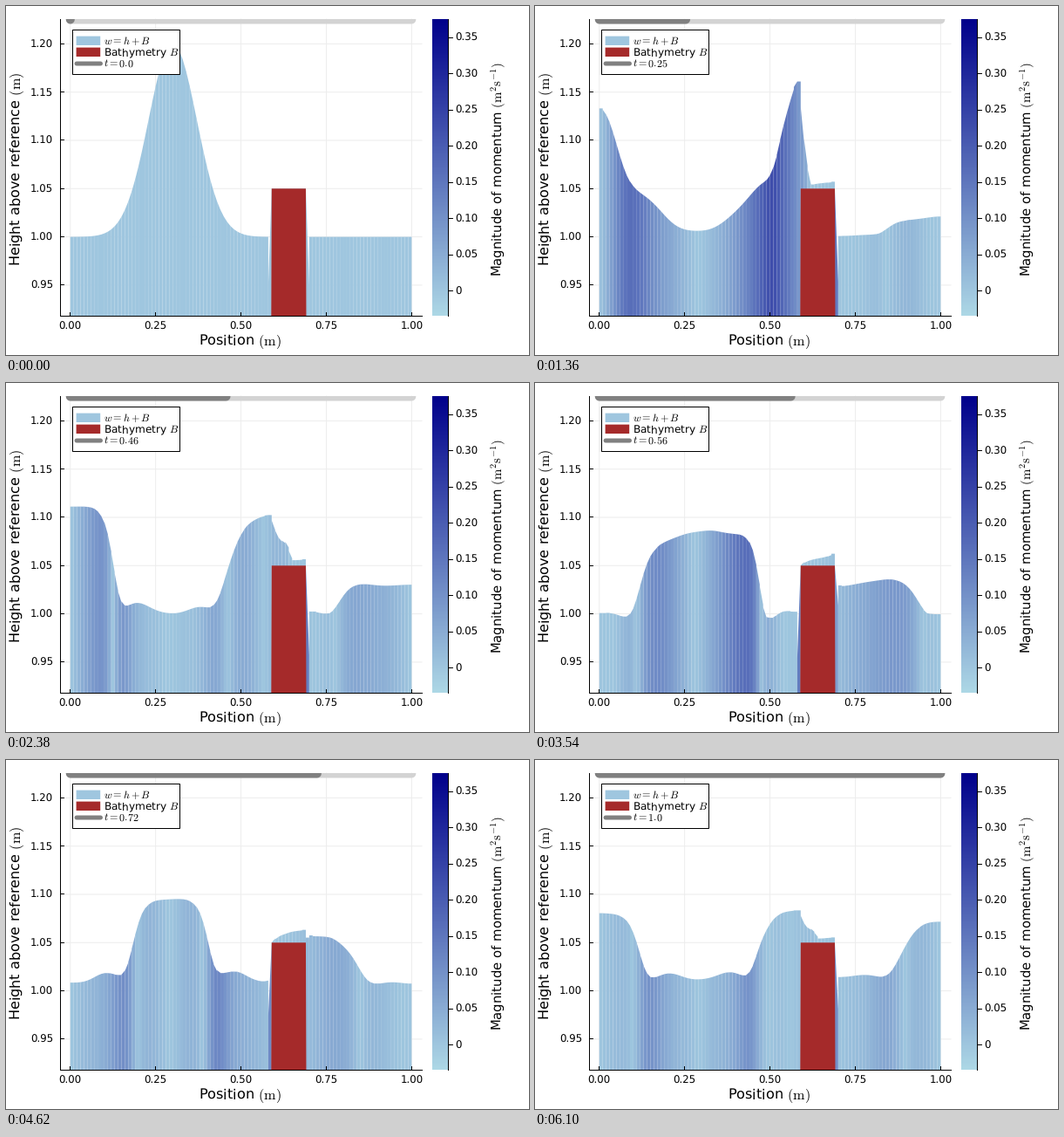
A matplotlib script that plays this animation: 600x400 px, repeating every 6120 ms.

```python
import numpy as np
import matplotlib.pyplot as plt
from matplotlib.animation import FuncAnimation
from matplotlib.collections import PolyCollection
from matplotlib.colors import LinearSegmentedColormap
from matplotlib.patches import Polygon, Rectangle

plt.rcParams.update({"font.family": "DejaVu Sans", "mathtext.fontset": "cm",
                     "text.hinting": "none"})

# --- Shallow water over a block: central-upwind scheme, linear bathymetry ---
N, G, THETA = 100, 9.81, 2.0
DX = 1 / N
FRAMES, INTERVAL = 306, 20

nodes = np.arange(N + 1)
faces = nodes * DX
B = np.where((nodes >= 59) & (nodes <= 69), 1.05, 0.0)
BL, BR = B[:-1], B[1:]
BC = (BL + BR) / 2


def half_slope(q, sign):
    """Generalised minmod slope, with walls mirrored by sign."""
    d = np.diff(np.concatenate(([sign * q[0]], q, [sign * q[-1]])))
    a, b = d[:-1], d[1:]
    c = (a + b) / 2
    size = np.minimum(THETA * np.minimum(abs(a), abs(b)), abs(c))
    return np.where(a * b > 0, np.sign(c) * size, 0) / 2


def surface(w):
    """Water level at both ends of every cell, never below the bed."""
    s = half_slope(w, 1)
    left, right = w - s, w + s
    dry = right < BR
    left, right = np.where(dry, 2 * w - BR, left), np.where(dry, BR, right)
    dry = left < BL
    return np.where(dry, BL, left), np.where(dry, 2 * w - BL, right)


def side(w, m):
    """Velocity, momentum, momentum flux and wave speed on one side of the faces."""
    h = np.maximum(w - B, 0)
    h4 = h ** 4
    u = np.sqrt(2) * h * m / np.sqrt(h4 + np.maximum(h4, DX ** 4))
    m = h * u
    return u, m, m * u + G / 2 * h * h, np.sqrt(G * h)


def rates(w, m):
    wl, wr = surface(w)
    s = half_slope(m, -1)
    ml, mr = m - s, m + s
    w1, w2 = np.append(wl[0], wr), np.append(wl, wr[-1])
    u1, m1, f1, c1 = side(w1, np.append(-ml[0], mr))
    u2, m2, f2, c2 = side(w2, np.append(ml, -mr[-1]))
    hi = np.maximum(np.maximum(u1 + c1, u2 + c2), 0)
    lo = np.minimum(np.minimum(u1 - c1, u2 - c2), 0)
    span = hi - lo
    span[span < 1e-12] = 1
    mass = (hi * m1 - lo * m2 + hi * lo * (w2 - w1)) / span
    force = (hi * f1 - lo * f2 + hi * lo * (m2 - m1)) / span
    dw = -np.diff(mass) / DX
    dm = -np.diff(force) / DX - G * (w - BC) * (BR - BL) / DX
    return dw, dm, max(hi.max(), -lo.min())


def simulate(times):
    x = faces[:-1] + DX / 2
    w = np.maximum(1 + 0.2 * np.exp(-100 * (x - 0.3) ** 2), BC)
    m = np.zeros(N)
    t, states = 0.0, []
    for stop in times:
        while t < stop - 1e-10:
            dw, dm, speed = rates(w, m)
            dt = min(max(0.4 * DX / speed, 1e-4), stop - t)
            w1 = np.maximum(w + dt * dw, BC)
            m1 = m + dt * dm
            dw, dm, _ = rates(w1, m1)
            w = np.maximum((w + w1 + dt * dw) / 2, BC)
            m = (m + m1 + dt * dm) / 2
            t += dt
        states.append((*surface(w), abs(m)))
    return states


# Adaptive time steps: slower while the wave climbs the block
times = np.interp(np.arange(FRAMES),
                  [0, 37, 68, 119, 177, 231, 305],
                  [0, 0.141, 0.2535, 0.4565, 0.5615, 0.723, 1])
states = simulate(times)

# --- Drawing, in pixel coordinates ---
PX = 0.72
LEFT, RIGHT, TOP, BOTTOM = 62, 477, 15, 355
M_LO, M_HI = -0.0343, 0.3753
cmap = LinearSegmentedColormap.from_list("depth", ["lightblue", "darkblue"])


def px(x):
    return 73.75 + 391.6 * np.asarray(x)


def py(w):
    return 43.4 + 1106 * (1.2 - np.asarray(w))


def cpy(v):
    return 326.7 - 830 * v


def shade(m):
    return cmap(np.clip((m - M_LO) / (M_HI - M_LO), 0, 1))


fig = plt.figure(figsize=(6, 4), dpi=100, facecolor="white")
ax = fig.add_axes([0, 0, 1, 1])
ax.axis("off")


def line(xs, ys, color="black", width=1, **kw):
    return ax.plot(xs, ys, color=color, lw=width * PX, **kw)[0]


def label(x, y, s, size=8.5, **kw):
    return ax.text(x, y, s, fontsize=size, va="baseline", zorder=9, **kw)


def grid(xs, ys):
    line(xs, ys, "0.93", zorder=1, snap=False)


xticks = np.arange(5) / 4
yticks = 0.95 + 0.05 * np.arange(6)

for v in xticks:
    x = px(v)
    grid([x, x], [TOP, BOTTOM])
    line([x - 0.5] * 2, [BOTTOM, BOTTOM - 4], zorder=5)
    label(x, 371.2, f"{v:.2f}", ha="center")
for v in yticks:
    y = py(v)
    grid([LEFT, RIGHT], [y, y])
    line([LEFT, LEFT + 4], [y - 0.5] * 2, zorder=5)
    label(54, y + 4.1, f"{v:.2f}", ha="right")
line([LEFT, LEFT, RIGHT], [TOP, BOTTOM, BOTTOM], zorder=5)

label(268.5, 388.7, r"Position $(\mathrm{m})$", 11.6, ha="center")
label(17, 186.5, r"Height above reference $(\mathrm{m})$", 11.6, ha="center",
      rotation=90, rotation_mode="anchor")
label(569.3, 187, r"Magnitude of momentum $(\mathrm{m}^2\mathrm{s}^{-1})$", 10.7,
      ha="center", rotation=90, rotation_mode="anchor")

# Colour scale
ax.imshow(np.linspace(0, 1, 256)[:, None], cmap=cmap, origin="lower",
          extent=(489, 507, 355.5, 15.5), aspect="auto", interpolation="nearest")
line([507, 507], [TOP, BOTTOM], zorder=5)
for k in range(8):
    y = cpy(0.05 * k)
    line([507, 512], [y - 0.5] * 2, zorder=5)
    label(515, y + 4, f"{0.05 * k:.2f}" if k else "0", ha="left")

# Water, block and time bar
frame = Rectangle((62, 15), 415, 341, transform=ax.transData)
water = PolyCollection([], linewidths=0, edgecolors="none", zorder=2, snap=False)
ax.add_collection(water, autolim=False)
water.set_clip_path(frame)
block = Polygon(np.column_stack((px([0.58, 0.59, 0.69, 0.70]),
                                 py([0, 1.05, 1.05, 0]))),
                facecolor="brown", edgecolor="none", zorder=3)
ax.add_patch(block)
block.set_clip_path(frame)


def time_bar(t, color):
    bar = line(px([0, t]), [15.5, 15.5], color, 10, zorder=4,
               solid_capstyle="round", snap=False)
    bar.set_clip_path(frame)
    return bar


time_bar(1, "lightgray")
elapsed = time_bar(0.001, "gray")

# Legend
ax.add_patch(Rectangle((76, 27), 123, 51, facecolor="white",
                       edgecolor="black", lw=PX, zorder=7))
for y, color in ((34.6, shade(0)), (47.6, "brown")):
    ax.add_patch(Rectangle((80.6, y), 27.6, 10.4, facecolor=color, lw=0,
                           zorder=8, snap=False))
line([81, 108.5], [66, 66], "gray", 5, zorder=8, solid_capstyle="round", snap=False)
label(112, 44, "$w = h + B$", 8.7)
label(112, 57, "Bathymetry $B$", 8.7)
clock = label(112, 70, "", 8.7)

ax.set_xlim(0, 600)
ax.set_ylim(400, 0)

edges = px(faces)
verts = np.full((N, 4, 2), 400.0)
verts[:, 0, 0] = verts[:, 1, 0] = edges[:-1]
verts[:, 2, 0] = verts[:, 3, 0] = edges[1:]


def draw(i):
    left, right, m = states[i]
    verts[:, 1, 1] = py(left)
    verts[:, 2, 1] = py(right)
    water.set_verts(verts.copy())
    water.set_facecolor(shade(m))
    t = float(times[i])
    elapsed.set_xdata(px([0, max(t, 0.0002)]))
    clock.set_text(f"$t = {round(t, 2)}$")
    return water, elapsed, clock


anim = FuncAnimation(fig, draw, frames=FRAMES, interval=INTERVAL,
                     repeat=True, repeat_delay=0)
plt.show()
```
